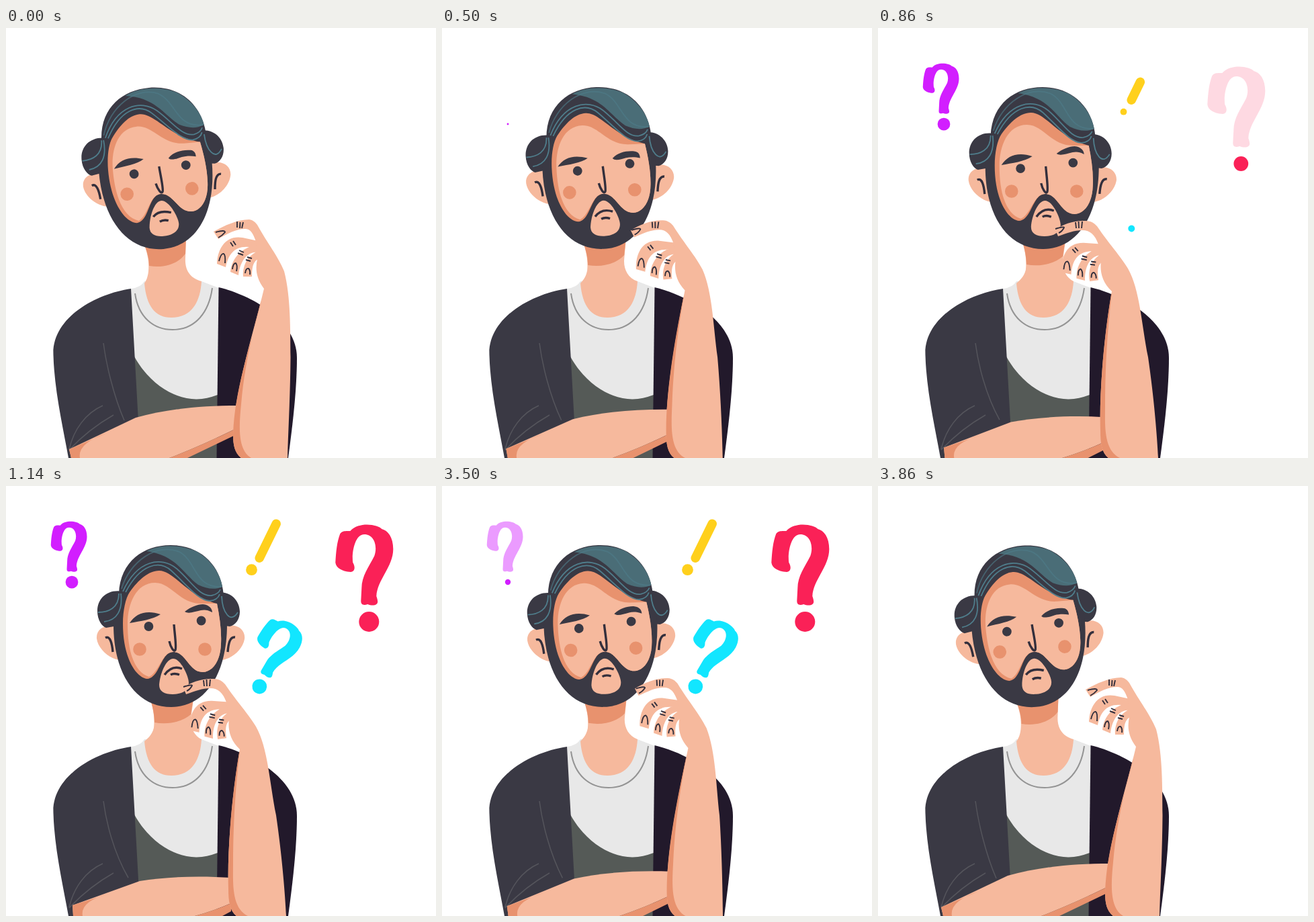
Animation, 640 px wide and 640 px high, one loop 3930 ms. Source, as an HTML page:

```html
<!DOCTYPE html>
<html lang="en">
<head>
<meta charset="utf-8">
<title>Thinking man</title>
<style>
  html, body { margin: 0; width: 100%; height: 100%; overflow: hidden; background: #fff; }
  svg { display: block; width: 100%; height: 100%; }
  .skin { fill: #f6b99d; }
  .shade { fill: #e8926e; }
  .dark { fill: #3a3944; }
  .line { fill: none; stroke: #332f3c; stroke-width: 3.4; }
  .fine { fill: none; stroke: #332f3c; stroke-width: 1.9; }
  .eyes { fill: none; stroke: #3a3944; stroke-width: 13.8; stroke-linecap: round; }
  .strand { fill: none; stroke: #4f7d8b; stroke-width: 1.8; }
  .seam { fill: none; stroke: #55555c; stroke-width: 1.5; }
</style>
</head>
<body>
<svg viewBox="0 0 640 640">
  <!-- data-to holds the second pose; data-track names the motion between both -->
  <g id="torso">
    <path fill="#e8e8e8" d="M186,388 Q201,386 206,377 L291,377 L317,387 V640 H186Z"/>
    <path fill="#555a57" d="M191,489 C216,534 255,553 284,552.500 Q299,552 315,546 V640 H191Z"/>
    <path class="skin" data-track="head"
      d="M204,318 C212,338 213,350 212,362 C211,372 208,377 206,380 C209,414 222,431 246,431 C275,431 289,410 291,377 C272,372 266,358 267,342 L268,310Z"
      data-to="M215,318 C221,338 221,350 220,360 C217,372 209,377 206,380 C209,414 222,431 246,431 C275,431 289,410 291,377 C280,372 274,358 275,347 L280,310Z"/>
    <path class="shade" data-track="head"
      d="M204,318 C211,334 213,345 213,354 C237,358 257,350 267,336 L268,310Z"
      data-to="M215,318 C220,334 221,345 221,352 C243,356 264,350 275,340 L280,310Z"/>
    <path fill="none" stroke="#949494" stroke-width="2" d="M192,395 C197,431 220,449 248,449 C282,449 302,423 307,387"/>
    <path class="dark" d="M186,388 C132,396 68,432 70.500,487 C72,540 85,595 93,640 H200Z"/>
    <path fill="#22192b" d="M316.500,386 C363,397 433,434 433,491 C433,540 426,595 420,640 H313.500Z"/>
    <path class="seam" data-track="forearm" d="M145,469 C149,500 160,547 176,584" data-to="M145,469 C149,500 160,545 182,583"/>
    <path class="seam" d="M94,627 C101,597 119,573 144,562 M94,628 Q123,597 160,576"/>
  </g>

  <g id="head">
    <path class="skin" d="M164,208 C146,206 134,213 135,227 C137,243 155,258 170,259Z M325,209 C345,203 357,215 355,228 C352,243 338,256 322,259Z"/>
    <path class="line" d="M148,226 C155,222 158,235 159,247 M341,225 C333,224 331,235 330,247"/>
    <path class="dark" d="M174,157 C150,153 136,168 136,186 C136,200 143,209 149,211 L172,207Z M316,158 C336,157 348,172 348,187 C348,198 342,207 333,209 L318,207Z"/>
    <path class="dark" d="M168,160 C170,112 205,88 245,88 C290,88 318,118 323,155 L329,206 C329,282 295,329 246,329 C195,329 160,282 160,206Z"/>
    <path class="shade" d="M174,205 C174,185 178,167 184,158 C197,140 212,126 228,126 C250,126 270,164 314,175 C318,195 321,215 320,235 C319,264 305,277 293,277 C272,277 268,247 249,247 C230,247 229,286 210,287 C193,285 174,255 174,205Z"/>
    <path class="skin" d="M181,205 C181,176 193,144 222,144 C246,144 258,175 290,175 L314,175 C318,195 321,215 320,235 C319,264 305,277 293,277 C272,277 268,247 249,247 C232,247 228,277 213,284 C191,277 181,247 181,205Z"/>
    <path class="skin" d="M249,257 C260,257 272,283 272,293 C272,304 262,310 248,310 C236,310 228,306 228,296 C229,280 238,257 249,257Z"/>
    <path fill="#4a6d77" d="M209,97 C230,86 262,87 285,98 C309,113 320,135 322,150 C310,155 299,153 286,147 C264,131 254,103 209,97Z"/>
    <path class="strand" d="M174,157 C195,110 231,104 254,123 C276,142 288,165 306,163 Q316,161 319,154 M178,158 C200,116 228,110 246,126 C270,148 286,170 303,171 Q315,170 318,161"/>
    <path class="strand" d="M172,153 C184,112 225,84 258,98 C284,112 280,152 321,150" opacity=".6"/>
    <path class="strand" d="M137,188 C152,188 168,182 168,160 M146,202 C165,200 174,185 171,160 M321,164 C322,188 334,206 345,188"/>
    <g class="shade"><circle cx="199" cy="243" r="9.800"/><circle cx="296" cy="243" r="9.800"/></g>
    <path class="dark" data-track="brow" d="M183,204 C193,190 208,187 228,193 C218,200 200,201 183,204Z"
      data-to="M184,204 C193,189 210,184 230,191 C218,199 200,201 184,204Z"/>
    <path class="dark" data-track="brow" d="M265,195 C273,186 288,184 299,186 C304,187 306,191 306,196 C298,194 291,194 285,195 C278,197 268,199 265,195Z"
      data-to="M266,187 C275,180 285,176 293,176 C303,177 307,183 307,188 C300,184 295,184 290,185 C280,187 272,191 266,187Z"/>
    <path class="eyes" data-track="head" d="M212,214 l0,0 M290,207.500 l0,0" data-to="M212.400,209 l0,0 M290.600,200.500 l0,0"/>
    <path class="line" d="M250,206 C251,220 254,240 252,244 C250,248 245,240 243,231"/>
    <path class="line" data-track="head" d="M235,280 Q244,270 262,276 M244,288 Q250,285 257,287.500"
      data-to="M236,281 Q247,266 262,272 M245,281 Q250,278 258,281"/>
  </g>

  <g id="forearm">
    <path class="skin" data-track="forearm" d="M94,627 L193,580 C240,567 290,562 345,562 L345,595 Q290,622 243,640 L97,640Z"
      data-to="M99,624 L199,588 C240,581 290,580 335,583 L335,621 Q310,632 281,640 L100,640Z"/>
    <path class="shade" data-track="forearm" d="M94,627 L150,603 Q106,618 110,640 L97,640Z M243,640 Q290,622 345,595 L345,604 L270,640Z"
      data-to="M99,624 L153,607 Q110,618 114,640 L100,640Z M281,640 Q310,632 335,621 L335,633 L322,640Z"/>
  </g>

  <g id="fingers">
    <path class="skin" d="M314,351 C315,328 327,308 352,312 L380,318 V330 C345,318 332,332 327,356Z
      M334,363 C336,342 352,324 380,322 V334 C357,330 348,350 346,368Z
      M353,370 C352,350 362,336 380,330 V342 C368,345 366,355 366,370Z"/>
    <path class="fine" d="M317,347 Q320,335 324,336 Q327,338 326,350 M337,359 Q338,350 342,350 Q345,353 343,362 M356,365 Q357,357 361,358 Q364,361 363,367
      M334,319 L338,325 M338,317 L342,323 M345,335 L353,338 M347,331 L354,334 M357,345 L364,347 M359,341 L366,343"/>
  </g>

  <g id="arm">
    <path class="skin" data-track="hand"
      d="M350,640 C340,632 338,620 338,605 C340,540 368,455 384,388 C372,372 371,358 374,344 L372,318 C368,306 364,299 356,299 C342,299 330,306 316,314 L309,303 C325,294 345,285 362,285 C368,286 371,289 374,293 C390,322 404,338 414,362 C424,400 423,450 423.500,490 C423,550 420,600 419,640Z"
      data-to="M343,640 C333,632 331,618 331,600 C329,540 337,455 348,392 C333,378 330,362 332,346 L328,322 C323,308 316,301 304,301 C292,301 282,305 268,310 L264,300 C275,292 292,286 309,287 C318,287 322,291 326,295 C345,323 360,338 372,358 C390,390 392,440 402,490 C410,545 415,600 417,640Z"/>
    <path class="shade" data-track="hand"
      d="M350,640 C340,632 338,620 338,605 C340,540 363,475 379,410 L380,405 C368,450 355,500 350,560 C347,590 344,628 365,640Z"
      data-to="M343,640 C333,632 331,618 331,600 C329,540 337,455 347,397 L348,394 C342,445 338,500 338,560 C338,590 335,628 360,640Z"/>
    <path class="fine" data-track="hand"
      d="M312,304 Q326,300 326,304 Q322,309 316,312 M344,288 L344,297 M348.500,289 L348,298 M353,289 L351,298"
      data-to="M264,299 Q277,295 277,297 Q274,303 269,305 M294,289 L295,298 M298.500,288 L299,298 M304,288 L303,298"/>
  </g>
  <g id="marks"></g>
</svg>
<script>
const LOOP = 3930;
const QUESTION = "M-43,-131 C-48,-118 -49,-104 -50,-88 C-49,-78 -35,-74 -27,-74 C-21,-75 -20,-81 -24,-88 " +
  "C-26,-100 -22,-130 -7,-130 C8,-130 13,-112 8,-98 C0,-82 -11,-68 -11,-50 L-12,-31 C-12,-25 -8,-24 -2,-26 " +
  "C3,-24 8,-24 11,-26 C14,-28 13,-32 11,-38 C12,-62 36,-82 36,-108 C36,-126 28,-136 19,-138 " +
  "C14,-144 -14,-150 -28,-135 C-33,-135 -40,-136 -43,-131Z";

const byId = id => document.getElementById(id);
const ramp = (t, start, end) => Math.min(1, Math.max(0, (t - start) / (end - start)));
const smooth = u => (1 - Math.cos(Math.PI * u)) / 2;
const soft = u => (u + smooth(u)) / 2;

// Each track rises from the resting pose (0) to the thinking pose (1) and falls back.
const tracks = {
  head: t => soft(ramp(t, 100, 880)) - soft(ramp(t, 3200, LOOP)),
  brow: t => smooth(ramp(t, 480, 860)) - smooth(ramp(t, 3210, 3800)),
  hand: t => smooth(ramp(t, 60, 820)) - soft(ramp(t, 3170, 3820)),
  forearm: t => smooth(ramp(t, 150, 1140)) - smooth(ramp(t, 3210, 3840))
};

const morphs = [...document.querySelectorAll("[data-to]")].map(el => ({
  el, track: el.dataset.track, from: el.getAttribute("d"),
  to: el.dataset.to.match(/-?[\d.]+/g).map(Number)
}));

function morph({ el, track, from, to }, pose) {
  let i = 0;
  const p = pose[track];
  el.setAttribute("d", from.replace(/-?[\d.]+/g, n => (+n + (to[i++] - n) * p).toFixed(2)));
}

const marks = [
  { x: 98, y: 143, scale: .625, turn: 0, color: "#d21eff", enter: 460, leave: 3390 },
  { x: 540.3, y: 202, scale: 1, turn: 0, color: "#fa2157", enter: 665, leave: 3655 },
  { x: 365.5, y: 124.7, scale: 1, turn: 0, color: "#ffd01c", enter: 703, leave: 3510, bar: true },
  { x: 377.3, y: 298.4, scale: .73, turn: 27.5, color: "#12e6ff", enter: 738, leave: 3585 }
];

function add(parent, tag, attributes) {
  const el = document.createElementNS("http://www.w3.org/2000/svg", tag);
  for (const name in attributes) el.setAttribute(name, attributes[name]);
  return parent.appendChild(el);
}

for (const m of marks) {
  const group = add(byId("marks"), "g", {
    fill: m.color, transform: `translate(${m.x} ${m.y}) rotate(${m.turn}) scale(${m.scale})`
  });
  m.dot = add(group, "circle", {});
  m.sign = m.bar
    ? add(group, "path", { stroke: m.color, "stroke-width": 13.5, "stroke-linecap": "round" })
    : add(group, "path", { d: QUESTION });
}

function drawMark(m, t) {
  const stay = 1 - ramp(t, m.leave, m.leave + 200);
  const ink = ramp(t, m.enter + (m.bar ? 0 : 155), m.enter + (m.bar ? 300 : 400)) * stay;
  m.dot.setAttribute("r", (m.bar ? 8.4 : 15) * ramp(t, m.enter, m.enter + 270) * stay);
  if (m.bar) {
    m.sign.setAttribute("d", `M11.700,-17.500 l${25 * ink},${-51 * ink}`);
    m.sign.setAttribute("visibility", ink > 0 ? "visible" : "hidden");
  } else {
    m.sign.setAttribute("opacity", ink);
  }
}

function draw(t) {
  const pose = {};
  for (const name in tracks) pose[name] = tracks[name](t);
  morphs.forEach(m => morph(m, pose));
  byId("head").setAttribute("transform", `rotate(${-4.95 * (1 - pose.head)} 239 463)`);
  byId("fingers").setAttribute("transform",
    `translate(${-40 * pose.hand} ${9 * pose.hand}) rotate(${-8 * pose.hand} 340 353)`);
  marks.forEach(m => drawMark(m, t));
}

const begin = performance.now();
function tick() {
  draw((performance.now() - begin) % LOOP);
  requestAnimationFrame(tick);
}
tick();
</script>
</body>
</html>
```
